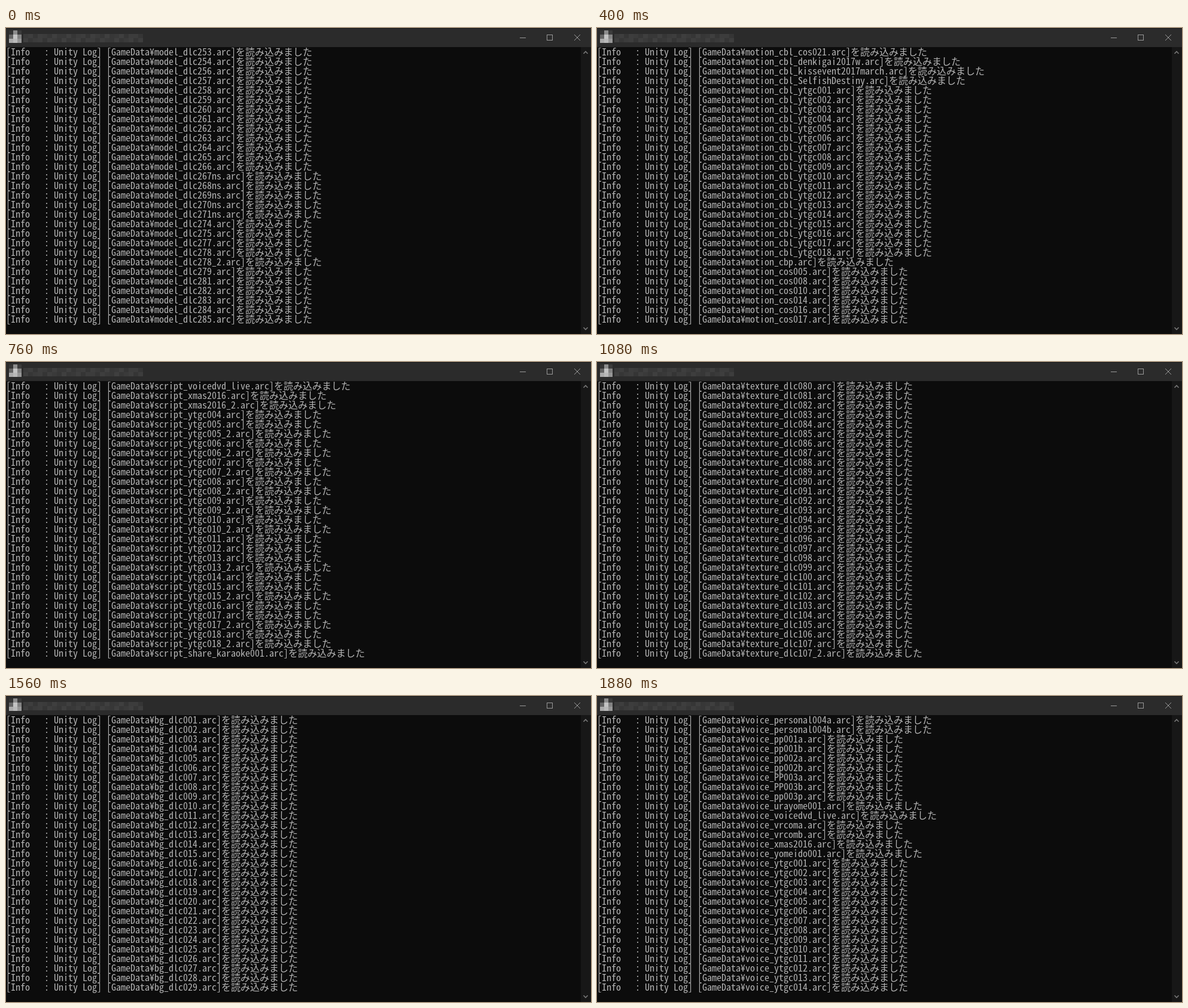
An HTML page with a canvas for the animation above (1.92 s loop, 978 by 513 pixels).

```html
<!DOCTYPE html>
<html lang="ja">
<head>
<meta charset="utf-8">
<title>Console log</title>
<style>
  html, body { margin: 0; width: 100%; height: 100%; overflow: hidden; background: #0c0c0c; }
  canvas { position: absolute; left: 0; top: 0; }
  #log { position: absolute; left: 0; top: 31px; width: 961px; color: #b4b4b4; }
  #log div { height: 16px; line-height: 16px; white-space: pre;
    font: 300 16px/16px "Noto Sans CJK JP", "Noto Sans Mono CJK JP", "Noto Sans CJK", sans-serif; }
  #log span { font-family: "Noto Sans Mono CJK JP", "Liberation Mono", monospace; }
</style>
</head>
<body>
<canvas id="chrome" width="978" height="513"></canvas>
<div id="log"></div>
<script>
const STEP = 40, STEPS = 48, ROWS = 29, CELL = 8;
const ctx = document.getElementById('chrome').getContext('2d');
const log = document.getElementById('log');

// Each section: the step at which its first line is on top, the page shown
// then, and the archives that scroll by afterwards.
// [001-018] counts up, {a,b} lists alternatives.
const sections = [
  [0, `model_dlc{253,254} model_dlc[256-266] model_dlc[267-271]ns model_dlc{274,275,277,278,278_2,279}
    model_dlc[281-285]`,
    `model_dlc[286-340] model_dlc[341-352]{,_2} model_denkigai{2015s,2015w,2016s,2016w,2017w}
    model_karaoke[001-012] model_kissevent2017march model_magazine[001-003] model_maidcafec{,2,3}
    model_nijiyomec model_oldplus[002-005]hair[1-2] model_omytgc[001-008] model_ordermade[001-002]
    model_personal[002-004] model_pp[001-003] model_yomeidokanteidan_{sticker,swordset,stickerset_limited}
    model_ytgc[001-018] motion motion_2 motion_anniversary[001-012] motion_cas[001-030]
    motion_cbl motion_cbl_cos[001-020]`],
  [10, `motion_cbl_{cos021,denkigai2017w,kissevent2017march,SelfishDestiny} motion_cbl_ytgc[001-018]
    motion_cbp motion_cos{005,008,010,014,016,017}`,
    `motion_cos[018-034] motion_denkigai{2015s,2015w,2016s,2016w} motion_karaoke[001-010]
    motion_maidcafec{,2,3} motion_pp[001-003] motion_vrcom{a,b} motion_ytgc[001-018]
    parts parts_2 parts_cos[001-024] prioritymaterial script script_{a,b,c} script_anniversary001
    script_cbl_cos[001-021] script_cbl_ytgc[001-018] script_cos[001-034]{,_2}
    script_denkigai2017w script_kissevent2017march script_maidcafec{,2,3}
    script_personal[002-004] script_pp[001-003] script_urayome001`],
  [19, `script_voicedvd_live script_xmas2016{,_2} script_ytgc004 script_ytgc[005-010]{,_2}
    script_ytgc[011-012] script_ytgc013{,_2} script_ytgc014 script_ytgc015{,_2} script_ytgc016
    script_ytgc[017-018]{,_2} script_share_karaoke001`,
    `script_share_karaoke[002-016] sound sound_2 sound_cos[001-018] sound_karaoke[001-016]
    sound_pp[001-003] sound_vrcom{a,b} sound_ytgc[001-018] system system_2
    texture texture_{2,3} texture_anniversary001 texture_bugbug{,003}
    texture_cbl_cos[001-021] texture_cos[001-021] texture_denkigai{2015s,2015w,2016s,2016w,2017w}
    texture_dlc[001-079]`],
  [27, `texture_dlc[080-107] texture_dlc107_2`,
    `texture_dlc[108-266] texture_dlc[267-271]ns texture_dlc[274-340] texture_karaoke[001-012]
    texture_kissevent2017march texture_kissevent2017march_limitedcostume`],
  [35, `texture_magazine[001-003] texture_maidcafec{,2,3} texture_nijiyomec
    texture_oldplus[002-005]hair[1-2] texture_omytgc[001-008] texture_ordermade[001-002]
    texture_personal{002,004} texture_pp[001-002]`,
    `texture_pp003 texture_urayome001 texture_vrcom{a,b} texture_xmas2016 texture_yomeido001
    texture_yomeidokanteidan_{sticker,swordset} texture_ytgc[001-018] bg bg_2 bg_anniversary001
    bg_cbl_cos[001-021] bg_cos[001-034] bg_denkigai{2015s,2015w,2016s,2016w,2017w}
    bg_dlc[001-080] bg_karaoke[001-016] bg_kissevent2017march bg_maidcafec{,2,3}
    bg_omytgc[001-008] bg_personal[002-004] bg_pp[001-003] bg_vrcom{a,b} bg_xmas2016`],
  [43, `bg_yomeidokanteidan_{sticker,swordset} bg_ytgc{008,011} voice{,_a,_b,_c}
    voice_anniversary001 voice_bugbug{,003} voice_cbp voice_cos[001-010]
    voice_cos{010yan,011,011ane,012,012boku,013,014}`,
    `voice_cos[015-034] voice_denkigai{2015s,2015w,2016s,2016w,2017w} voice_karaoke[001-016]
    voice_kissevent2017march voice_maidcafec{,2,3} voice_nijiyomec voice_omytgc[001-008]
    voice_oldplus[002-005]{a,b} voice_ordermade[001-002] voice_personal[002-003]{a,b}`],
  [47, `voice_personal004{a,b} voice_pp[001-002]{a,b} voice_PP003{a,b} voice_pp003p
    voice_urayome001 voice_voicedvd_live voice_vrcom{a,b} voice_xmas2016 voice_yomeido001
    voice_ytgc[001-014]`, '']
];

function expand(s) {
  const m = s.match(/\[(\d+)-(\d+)\]|\{([^}]*)\}/);
  if (!m) return [s];
  let parts;
  if (m[1]) {
    parts = [];
    for (let n = +m[1]; n <= +m[2]; n++) parts.push(String(n).padStart(m[1].length, '0'));
  } else {
    parts = m[3].split(',');
  }
  const head = s.slice(0, m.index), tail = s.slice(m.index + m[0].length);
  return parts.flatMap(p => expand(head + p + tail));
}

const names = [], stops = [];
for (const [step, page, rest] of sections) {
  stops.push([step, names.length]);
  names.push(...(page + ' ' + rest).trim().split(/\s+/).flatMap(expand));
}

function topLine(step) {
  let i = stops.length - 1;
  while (stops[i][0] > step) i--;
  const [s0, l0] = stops[i];
  if (s0 === step) return l0;
  const [s1, l1] = stops[i + 1];
  return Math.round(l0 + (l1 - l0) * (step - s0) / (s1 - s0));
}

// Half-width glyphs occupy one 8px console cell.
const probe = document.createElement('span');
log.append(probe);
probe.style.fontSize = '100px';
probe.textContent = '0'.repeat(20);
const size = 100 * CELL * 20 / probe.getBoundingClientRect().width;
probe.remove();

const rows = Array.from({ length: ROWS }, () => {
  const row = document.createElement('div');
  const path = document.createElement('span');
  path.style.fontSize = size + 'px';
  row.append(path, 'を読み込みました');
  log.append(row);
  return path;
});

function rect(color, x, y, w, h) {
  ctx.fillStyle = color;
  ctx.fillRect(x, y, w, h);
}

function stroke(color, ...lines) {
  ctx.strokeStyle = color;
  ctx.beginPath();
  for (const line of lines) line.forEach(([x, y], i) => i ? ctx.lineTo(x, y) : ctx.moveTo(x, y));
  ctx.stroke();
}

const gray = v => `rgb(${v},${v},${v})`;

function drawChrome() {
  rect('#0c0c0c', 0, 0, 978, 513);
  rect('#2b2b2b', 0, 0, 978, 32);
  rect('#1a1a1a', 0, 0, 978, 1);
  rect('#171717', 961, 32, 17, 481);

  // Pixelated icon and caption
  const icon = [[52, 140, 60], [100, 195, 130], [170, 185, 150]];
  icon.forEach((line, j) => line.forEach((v, i) => rect(gray(v), 5 + i * 7, 4 + j * 7, 7, 7)));
  for (let i = 0; i < 25; i++) {
    for (let j = 0; j < 2; j++) {
      const v = 58 + Math.round(5 * Math.sin(i * 2.3 + j * 1.9));
      rect(gray(v), 29 + i * 8, 10 + j * 7, 8, 7);
    }
  }

  ctx.lineWidth = 1;
  stroke('#999', [[859, 16.5], [869, 16.5]]);
  ctx.strokeRect(904.5, 11.5, 9, 9);
  stroke('#999', [[950, 11], [960, 21]], [[960, 11], [950, 21]]);
  ctx.lineWidth = 1.6;
  stroke('#777', [[965.5, 43], [969, 39.5], [972.5, 43]], [[965.5, 502], [969, 505.5], [972.5, 502]]);
}

let shown = -1;
function render(step) {
  if (step === shown) return;
  shown = step;
  const top = topLine(step);
  rows.forEach((row, i) => {
    row.textContent = `[Info   : Unity Log] [GameData¥${names[top + i]}.arc]`;
  });
}

const start = performance.now();
function tick() {
  render(Math.floor((performance.now() - start) / STEP) % STEPS);
  requestAnimationFrame(tick);
}

drawChrome();
render(0);
requestAnimationFrame(tick);
</script>
</body>
</html>
```
